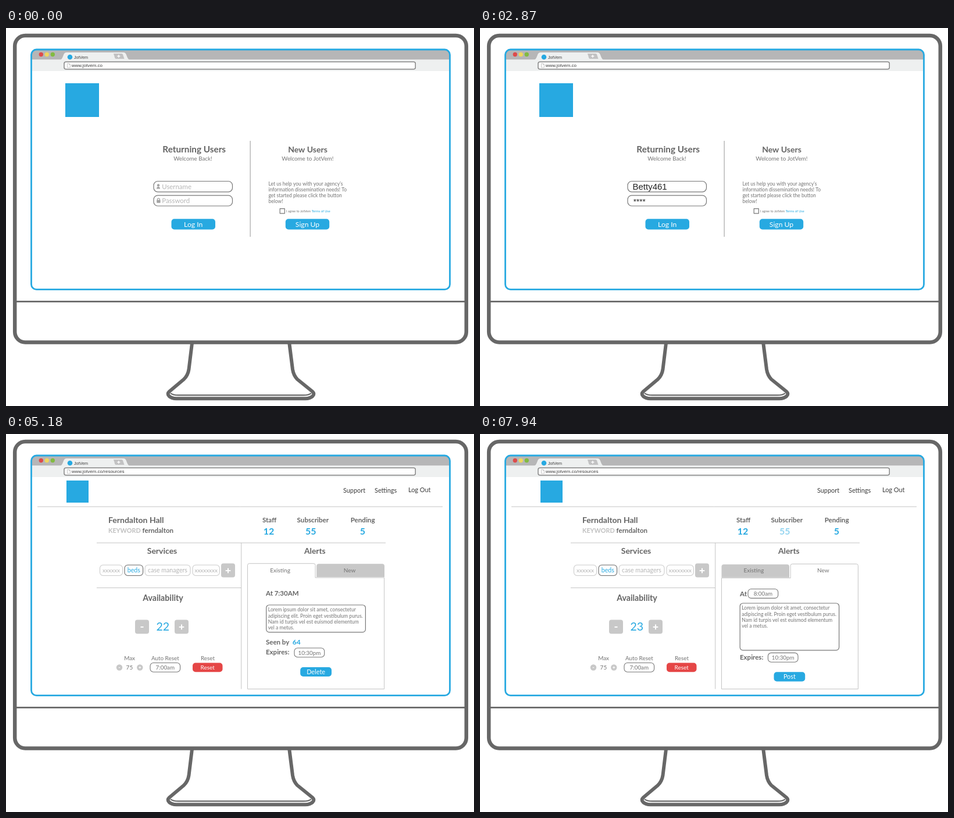
An HTML page with a canvas that plays this animation: 805x650 px, repeating every 8000 ms.

```html
<!DOCTYPE html>
<html lang="en">
<head>
<meta charset="utf-8">
<title>Sign in and manage availability</title>
<style>
html, body { margin: 0; width: 100%; height: 100%; overflow: hidden; background: #fff; }
canvas { display: block; width: 805px; height: 650px; }
</style>
</head>
<body>
<canvas id="stage"></canvas>
<script>
const W = 805, H = 650, LOOP = 8000;
const BRAND = 'JotVem', SITE = 'www.jotvem.co';
const USER = 'Betty461', PLACE = 'Ferndalton Hall', KEYWORD = 'ferndalton';
const BLUE = '#27a9e1', FRAME = '#676767', INK = '#646464', SOFT = '#737373';
const RULE = '#c4c4c4', GREY = '#c8c8c8', PALE = '#b5b5b5', RED = '#e54646', DARK = '#3c3c3c';
const SANS = 'Lato, sans-serif', ARIAL = '"Liberation Sans", sans-serif';
const LOREM = [
  'Lorem ipsum dolor sit amet, consectetur',
  'adipiscing elit. Proin eget vestibulum purus.',
  'Nam id turpis vel est euismod elementum',
  'vel a metus.'
];

const canvas = document.getElementById('stage');
const ctx = canvas.getContext('2d');
const ratio = window.devicePixelRatio || 1;
canvas.width = W * ratio;
canvas.height = H * ratio;

function text(str, x, y, size, color = INK, { bold = false, align = 'left', font = SANS } = {}) {
  ctx.font = `${bold ? 700 : 400} ${size}px ${font}`;
  ctx.textAlign = align;
  ctx.fillStyle = color;
  ctx.fillText(str, x, y);
}
const centered = (str, x, y, size, color, bold = false) =>
  text(str, x, y, size, color, { bold, align: 'center' });
const heading = (str, x, y, size = 14) => centered(str, x, y, size, INK, true);

// Boxes are given by their left, top, right and bottom edges.
function box(l, t, r, b, radius, fill, stroke, width = 1.2) {
  ctx.beginPath();
  ctx.roundRect(l, t, r - l, b - t, radius);
  paint(fill, stroke, width);
}
function paint(fill, stroke, width = 1) {
  if (fill) { ctx.fillStyle = fill; ctx.fill(); }
  if (stroke) { ctx.strokeStyle = stroke; ctx.lineWidth = width; ctx.stroke(); }
}
function line(x1, y1, x2, y2, color = RULE, width = 1) {
  ctx.beginPath();
  ctx.moveTo(x1, y1);
  ctx.lineTo(x2, y2);
  paint(null, color, width);
}
function shape(d, fill, stroke, width) {
  const path = new Path2D(d);
  if (fill) { ctx.fillStyle = fill; ctx.fill(path); }
  if (stroke) { ctx.strokeStyle = stroke; ctx.lineWidth = width; ctx.stroke(path); }
}
function dot(x, y, r, fill) {
  ctx.beginPath();
  ctx.arc(x, y, r, 0, Math.PI * 2);
  paint(fill);
}
function faded(on, draw) {
  ctx.globalAlpha = on ? 0.5 : 1;
  draw();
  ctx.globalAlpha = 1;
}
function button(l, t, r, b, label, baseline, size, fill = BLUE) {
  box(l, t, r, b, 5, fill);
  centered(label, (l + r) / 2, baseline, size, '#fff');
}
function pill(l, t, r, b, label, baseline, size = 9.8, stroke = '#777', color = SOFT) {
  box(l, t, r, b, 5.5, '#fff', stroke, 1.1);
  centered(label, (l + r) / 2, baseline, size, color);
}
// Square or round grey key with a minus or plus sign.
function sign(x, y, half, plus, color = '#fff', width = 2) {
  line(x - half, y, x + half, y, color, width);
  if (plus) line(x, y - half, x, y + half, color, width);
}
function key(l, t, plus) {
  box(l, t, l + 24, t + 24, 4, GREY);
  sign(l + 12, t + 12.5, plus ? 4.3 : 2.5, plus);
}
function lines(rows, x, y, step, size) {
  rows.forEach((row, i) => text(row, x, y + i * step, size, SOFT));
}
// Number of characters typed, the first one appearing at `start`.
const typed = (t, start) => t < start ? 0 : Math.floor((t - start) / 170) + 1;

function monitor() {
  box(15.2, 13, 791.8, 540.5, 18, '#fff', FRAME, 6.5);
  line(17, 470.4, 790, 470.4, FRAME, 2.6);
  ctx.lineJoin = 'round';
  shape('M320 542 L314.5 587 Q313 597 306 604 L281 625 Q276.5 629 280.5 633 Q285 637.3 293 637.3' +
        'H515 Q523 637.3 527.5 633 Q531.5 629 527 625 L501 604 Q494.5 597 493 587 L487.3 542',
        null, FRAME, 6);
  shape('M283 628 Q287 631.4 296 631.4 H512 Q521 631.4 525 628', null, FRAME, 2.2);
}

function browser(address) {
  ctx.save();
  ctx.beginPath();
  ctx.roundRect(43.5, 37, 720, 412.5, 9);
  ctx.fillStyle = '#fff';
  ctx.fill();
  ctx.clip();
  ctx.fillStyle = '#b6b6b7';
  ctx.fillRect(43, 36, 722, 18.5);
  ctx.fillStyle = '#eef0f0';
  ctx.fillRect(43, 54.5, 722, 19.5);
  shape('M93 55 Q96 54 97.5 50 L99.5 45 Q101 42 104 42 H202 Q205 42 206.5 45 L208.5 50 Q210 54 213 55 Z', '#eef0f0');
  ctx.restore();

  shape('M185 44 H199 Q200.5 44 201 45.5 L203.5 53 H189.5 Q188 53 187.3 51.5 Z', '#c2c2c3');
  sign(193.8, 48.5, 2.6, true, '#fff', 1.3);
  ['#dd4b4b', '#efd75f', '#82bb41'].forEach((c, i) => dot(60.3 + i * 10, 45.5, 3.7, c));
  dot(110, 50, 4.3, BLUE);
  text(BRAND, 117, 53, 7.2, DARK, { font: ARIAL });

  box(100, 58.3, 704.2, 70.8, 3, '#fff', '#858585', 1.5);
  shape('M105.5 61 H108.5 L110.5 63 V68 H105.5 Z M108.5 61 V63 H110.5', null, '#b0b0b0', 0.7);
  text(address, 112.7, 67.3, 8, DARK, { font: ARIAL });
  box(43.5, 37, 763.5, 449.7, 9, null, BLUE, 2.8);
}

function personIcon(x, y) {
  dot(x, y - 2, 2.2, '#a3a3a3');
  shape(`M${x - 3} ${y + 4} Q${x - 3} ${y + 0.5} ${x} ${y + 0.5} Q${x + 3} ${y + 0.5} ${x + 3} ${y + 4} Z`, '#a3a3a3');
}
function lockIcon(x, y) {
  shape(`M${x - 2} ${y} V${y - 1.5} A2 2 0 0 1 ${x + 2} ${y - 1.5} V${y}`, null, '#a3a3a3', 1.3);
  box(x - 3.2, y - 0.6, x + 3.2, y + 4.4, 0.7, '#a3a3a3');
}

function loginPage(t) {
  box(102, 95, 160, 153, 0, BLUE);
  line(420.2, 194, 420.2, 359, '#bcbcbc', 1.6);

  heading('Returning Users', 323.7, 213.8, 15.3);
  centered('Welcome Back!', 321.4, 228, 9.8, SOFT);
  box(254, 263.5, 389.5, 281.8, 7, '#fff', '#777');
  box(254, 287.8, 389.5, 306, 7, '#fff', '#777');

  const chars = typed(t, 1000);
  if (chars) {
    text(USER.slice(0, chars), 262.5, 278, 15, '#222', { font: ARIAL });
  } else {
    personIcon(262, 272.4);
    text('Username', 268.3, 277.2, 11.4, PALE);
  }
  const stars = Math.min(7, typed(t, 2360));
  if (stars) {
    text('*'.repeat(stars), 263.8, 303.3, 13.4, '#222', { font: ARIAL });
  } else {
    lockIcon(262.4, 296.4);
    text('Password', 268.3, 301.2, 11.4, PALE);
  }
  faded(t >= 3550 && t < 3880, () => button(284.5, 328.2, 360, 346.5, 'Log In', 342, 12.2));

  heading('New Users', 519, 213.6, 14);
  centered(`Welcome to ${BRAND}!`, 518.8, 228, 9.8, SOFT);
  lines(['Let us help you with your agency\u2019s', 'information dissemination needs! To',
         'get started please click the button', 'below!'], 451.5, 271.3, 9.9, 8.5);
  box(471.2, 310.6, 479.3, 318.8, 0, '#fff', '#777');
  text(`I agree to ${BRAND}`, 482, 317, 5.5, SOFT);
  text('Terms of Use', 525.7, 317, 5.6, BLUE);
  button(480.8, 328.2, 556.2, 346.5, 'Sign Up', 341.7, 12.2);
}

function stat(label, value, x, valueX, dim) {
  heading(label, x, 151.5, 11.6);
  faded(dim, () => centered(value, valueX, 172.8, 16, BLUE, true));
}

function services() {
  heading('Services', 268.5, 205.6);
  const tag = (l, r, label, size) => pill(l, 225.3, r, 243.5, label, 237.7, size, '#cbcbcb', PALE);
  tag(161.5, 200.5, 'xxxxxx', 10);
  pill(204, 225.3, 235.6, 243.5, 'beds', 237.7, 10.6, '#6a6a6a', BLUE);
  tag(239, 317, 'case managers', 10.6);
  tag(321, 367.3, 'xxxxxxxx', 9.9);
  key(370, 222.5, true);
}

function availability(t) {
  const pressed = (t >= 4850 && t < 5180) || (t >= 5650 && t < 5980);
  const count = 21 + (t >= 5180) + (t >= 5980);
  heading('Availability', 270, 287, 14.2);
  key(222, 319.4, false);
  text(String(count), 258.5, 338.3, 19.5, BLUE);
  faded(pressed, () => key(290, 319.4, true));

  centered('Max', 212.6, 389, 9.9, SOFT);
  dot(195, 401.5, 5.2, GREY);
  sign(195, 401.7, 1.2, false, '#fff', 1.1);
  centered('75', 212.4, 405, 10, SOFT);
  dot(230.3, 401.5, 5.2, GREY);
  sign(230.3, 401.5, 2, true, '#fff', 1.1);
  centered('Auto Reset', 273.8, 389, 9.9, SOFT);
  pill(248, 393.5, 299.6, 409.2, '7:00am', 405);
  centered('Reset', 347, 389, 9.9, SOFT);
  button(321, 393.5, 372.5, 409.3, 'Reset', 405, 10, RED);
}

function alerts(isNew) {
  heading('Alerts', 531.3, 205.6, 13.8);
  if (isNew) {
    box(415.5, 224.3, 532, 246.8, [4, 4, 0, 0], GREY);
    shape('M415.5 247.6 H534.2 V226.5 Q534.2 223.5 537.2 223.5 H647.4 Q650.4 223.5 650.4 226.5 V438.5 H415.5 Z',
          null, RULE, 1);
  } else {
    box(534.2, 223.3, 651, 246, [4, 4, 0, 0], GREY);
    shape('M650.6 247 H532 V225.5 Q532 222.7 529 222.7 H418.5 Q415.5 222.7 415.5 225.7 V438.5 H650.6 Z',
          null, RULE, 1);
  }
  const tabY = isNew ? 238.4 : 237.7;
  centered('Existing', isNew ? 470.8 : 471.5, tabY, 10.1, SOFT);
  centered('New', isNew ? 590.3 : 591, tabY, 10, SOFT);
  if (isNew) newAlert(); else existingAlert();
}

const label = (str, y) => text(str, 447, y, 11.5, INK, { bold: true });

function existingAlert() {
  label('At 7:30AM', 278);
  box(447.7, 294, 618.4, 340.8, 5, '#fff', '#777');
  lines(LOREM, 450.8, 305.3, 10.2, 8.6);
  label('Seen by', 362);
  text('64', 492.7, 362, 12, BLUE, { bold: true });
  label('Expires:', 378.8);
  pill(496, 368, 547.7, 383.7, '10:30pm', 379.8);
  button(506.2, 401, 560, 417, 'Delete', 412.9, 10.9);
}

function newAlert() {
  label('At', 279);
  pill(461, 266.5, 512.7, 282.4, '8:00am', 278.1);
  box(447.2, 291, 617.6, 371.8, 5, '#fff', '#777');
  lines(LOREM, 450.2, 302.4, 10.3, 8.6);
  label('Expires:', 387.5);
  pill(495.4, 376.4, 547, 392.2, '10:30pm', 388.2);
  button(505.5, 409.2, 559.2, 425.4, 'Post', 421.2, 10.8);
}

function dashboard(t) {
  box(104, 80, 142, 118, 0, BLUE);
  text('Support', 580, 101, 10.9, DARK);
  text('Settings', 634, 101, 10.9, DARK);
  text('Log Out', 692, 100.4, 10.9, DARK);
  line(54, 125, 751, 125);

  text(PLACE, 176, 153, 14, INK, { bold: true });
  text('KEYWORD', 176, 170.2, 10.8, '#c0c0c0', { bold: true });
  text(KEYWORD, 234.6, 170.2, 11.5, INK, { bold: true });
  stat('Staff', '12', 453, 452);
  stat('Subscriber', '55', 527.8, 524.3, t >= 7940);
  stat('Pending', '5', 613.6, 613.4);

  line(156, 187.2, 653, 187.2);
  line(404.7, 187, 404.7, 438.5);
  line(156, 264.5, 404.7, 264.5);
  services();
  availability(t);
  alerts(t >= 7210);
}

function draw(now) {
  const t = now % LOOP;
  const signedIn = t >= 4050;
  ctx.setTransform(ratio, 0, 0, ratio, 0, 0);
  ctx.fillStyle = '#fff';
  ctx.fillRect(0, 0, W, H);
  monitor();
  browser(signedIn ? SITE + '/resources' : SITE);
  if (signedIn) dashboard(t); else loginPage(t);
}

const start = performance.now();
function tick() {
  draw(performance.now() - start);
  requestAnimationFrame(tick);
}
tick();
</script>
</body>
</html>
```
